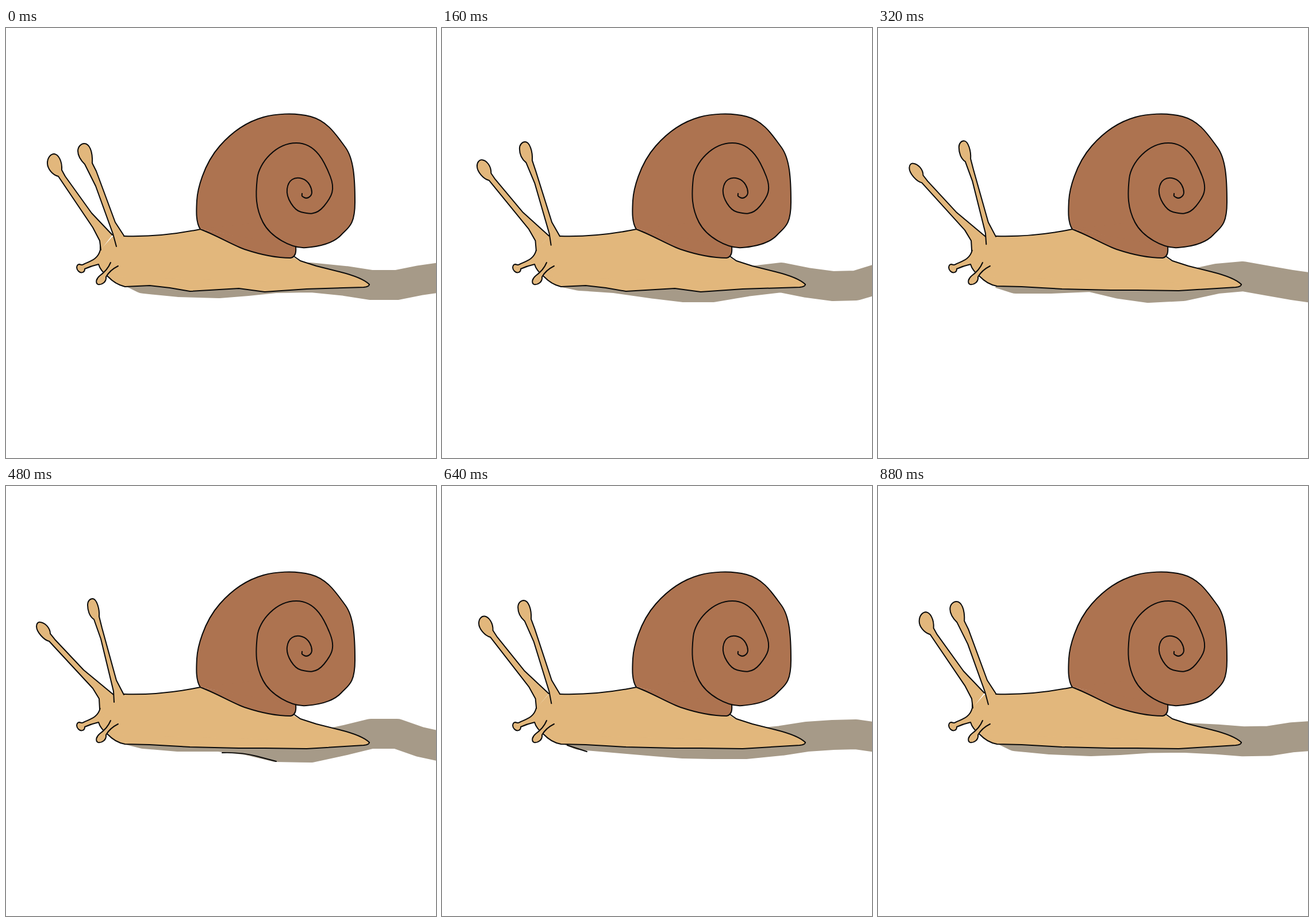
An HTML page without scripts for the animation above (960 ms loop, 748 px wide and 748 px high).

```html
<!DOCTYPE html>
<html lang="en">
<head>
<meta charset="utf-8">
<title>Crawling snail</title>
<style>
:root {
  /* Stepped easings: six held poses out, six held poses back */
  --reach: linear(0 0% 16.66%, .17 16.66% 33.33%, .4 33.33% 50%, .55 50% 66.66%, .85 66.66% 83.33%, .93 83.33% 100%);
  --retract: linear(0 0% 16.66%, .07 16.66% 33.33%, .15 33.33% 50%, .45 50% 66.66%, .6 66.66% 83.33%, .83 83.33% 100%);
}
html, body { margin: 0; width: 100%; height: 100%; overflow: hidden; background: #fff; }
svg { display: block; width: 100%; height: 100%; }
path { stroke: #0a0a0a; stroke-width: 2; stroke-linejoin: round; stroke-linecap: round; }
.skin { fill: #e2b77c; }
.shell { fill: #ad7350; }
.line { fill: none; }
.flat { stroke: none; }
.anim { animation: 960ms step-end infinite; }
.belly { animation-name: belly; }
.left { animation-name: left; }
.right { animation-name: right; }
.edge-mid { animation-name: edge-mid; }
.edge-front { animation-name: edge-front; }

/* The trail is one wide stroke, placed by its lower edge */
.trail {
  fill: none; stroke: #a69a88; stroke-width: 52; stroke-linecap: butt;
  transform: translateY(-26px);
  animation-name: trail; animation-timing-function: steps(2);
}
@keyframes trail {
  0%, 100% { d: path("M212 448L240 462 300 468 370 470 420 466 470 461 530 460 590 466 635 473 680 473 720 465 756 460"); }
  16.66% { d: path("M212 451L240 457 300 461 370 471 420 477 470 477 530 467 590 460 635 469 680 475 720 474 756 463"); }
  33.33% { d: path("M212 453L240 462 300 462 370 459 420 471 470 478 530 475 590 462 635 458 680 466 720 473 756 478"); }
  50% { d: path("M212 450L240 457 300 462 370 462 420 468 470 480 530 481 590 468 635 457 680 457 720 471 756 479"); }
  66.66% {
    d: path("M212 447L240 459 300 464 370 470 420 474 470 475 530 475 590 469 635 462 680 459 720 458 756 463");
    animation-timing-function: steps(4);
  }
}

@keyframes belly {
  0%, 100% { d: path("M177 432Q190 446 207 450L250 448 285 452 320 458 405 453 450 459 523 454 622 451Q632 450 632 446"); }
  25%, 75% { d: path("M177 432Q190 446 207 449L250 450 285 452 320 454 405 456 450 456 523 457 622 451Q632 450 632 446"); }
  0%, 75% { animation-timing-function: steps(3); }
}

@keyframes left {
  0%, 100% {
    d: path("M165 386L163 370 151 347 91 258C80 255 72 244 72 235C72 225 78 219 84 219C91 220 98 231 97 247L103 258 149 322 185 360");
    animation-timing-function: var(--reach);
  }
  50% {
    d: path("M163 388L162 370 151 352 75 270C66 268 53 254 53 244C53 239 56 236 60 237C68 238 77 247 77 257L85 267 135 320 187 363");
    animation-timing-function: var(--retract);
  }
}

@keyframes right {
  0%, 100% {
    d: path("M192 380L186 358 156 275 137 237C128 228 125 221 125 214C125 206 131 201 136 201C145 201 151 214 150 235L157 249 190 338 205 361");
    animation-timing-function: var(--reach);
  }
  50% {
    d: path("M188 376L187 357 165 266 153 232C145 227 142 216 142 207C142 200 146 196 151 196C158 197 163 214 162 227L167 247 192 338 205 363");
    animation-timing-function: var(--retract);
  }
}

@keyframes edge-mid { 0%, 58.33%, 100% { opacity: 0; } 50% { opacity: 1; } }
@keyframes edge-front { 0%, 75%, 100% { opacity: 0; } 66.66% { opacity: 1; } }
</style>
</head>
<body>
<svg viewBox="0 0 748 748">
  <path class="anim trail"/>
  <path class="line anim edge-mid" d="M376 464Q410 463 436 470L470 479"/>
  <path class="line anim edge-front" d="M218 451L252 462"/>

  <path class="skin flat" d="M165 385L185 363 205 362Q270 364 338 350L502 400 512 406 580 424Q620 434 632 446L600 449 210 444 178 431 163 408Z"/>
  <path class="skin" d="M177 432Q164 422 161 411Q148 414 137 419C137 426 130 427 126 423C121 418 123 411 128 411Q132 413 135 411C148 405 160 402 164 386V378"/>
  <path class="skin anim left"/>
  <path class="skin anim belly"/>
  <path class="line" d="M632 446Q620 434 580 424L540 414 512 405 502 398M338 350Q270 364 205 362"/>
  <path class="skin anim right"/>
  <path class="skin" d="M182 408C177 420 170 426 163 431C157 436 155 443 160 446C167 447 175 442 174 433C179 424 187 418 195 414"/>

  <path class="shell flat" d="M338 350L447 330 515 380 504 382Z"/>
  <path class="shell" d="M338 350C365 360 395 378 415 385C445 395 470 400 495 400Q506 398 504 380"/>
  <path class="shell" d="M338 350C330 338 331 318 332 300S343 238 372 205S430 160 448 155S500 146 530 154S575 187 590 207S607 262 607 303S595 347 583 360S548 380 522 382S460 363 447 338"/>
  <path class="line" d="M447 338C434 313 434 290 437 262S470 200 505 200S555 235 564 258S567 293 553 310S525 323 513 320S487 296 489 280S502 258 515 262S532 280 532 286S525 298 519 295S515 292 515 288"/>
</svg>
</body>
</html>
```
